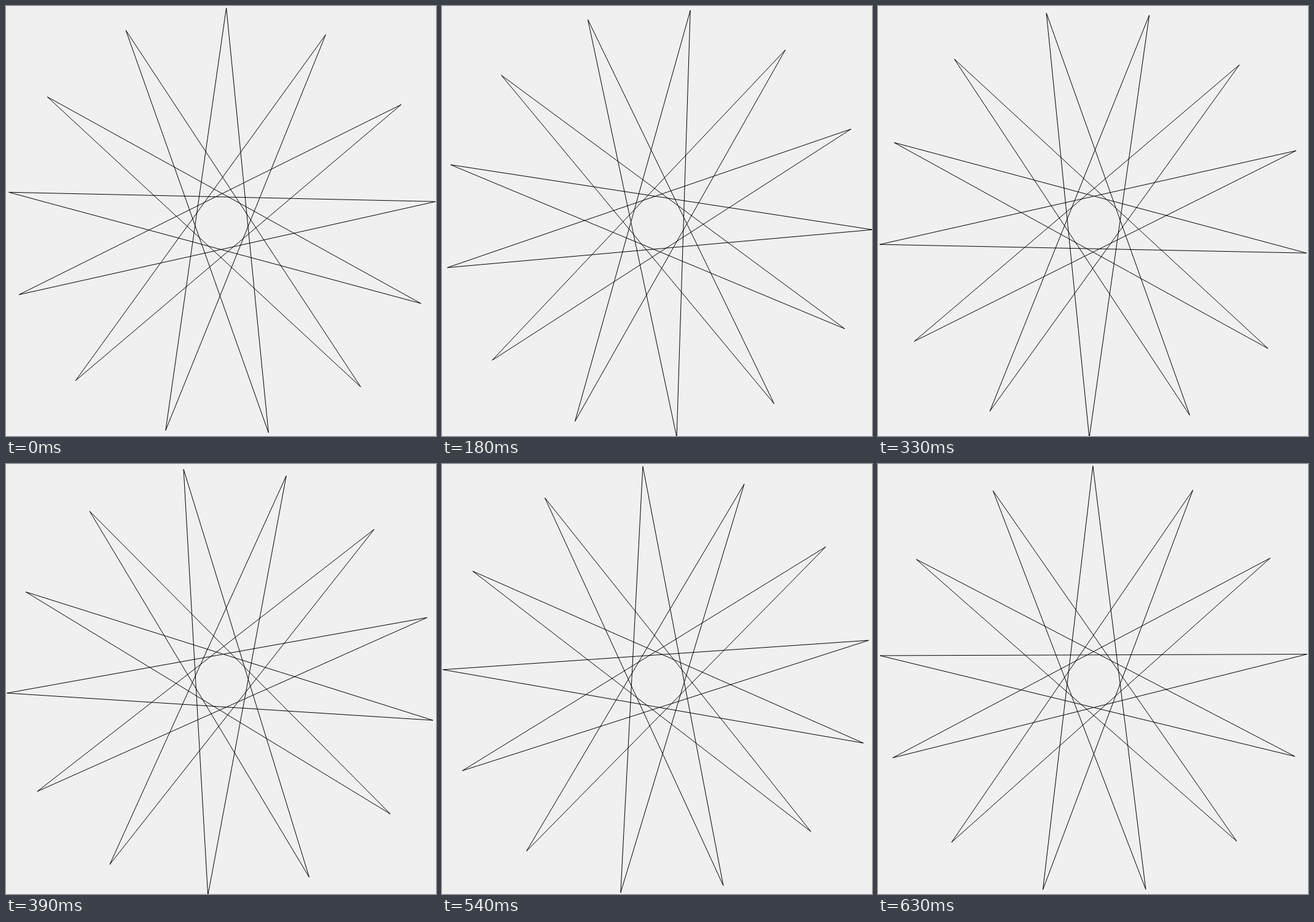
Recreate the animation shown at these times as an HTML page with a canvas. Size 700 by 700 pixels, loop 660 ms.

```html
<!DOCTYPE html>
<html lang="en">
<head>
<meta charset="utf-8">
<title>Turning star</title>
<style>
  html, body { margin: 0; width: 100%; height: 100%; overflow: hidden; background: #f0f0f0; }
  canvas { display: block; }
</style>
</head>
<body>
<canvas id="stage" width="700" height="700"></canvas>
<script>
const ctx = document.getElementById('stage').getContext('2d');
const SIZE = 700;
const POINTS = 13, SKIP = 6;
const CX = 351, CY = 353, RADIUS = 350;
const STEP_MS = 30, STEPS = 22, STEP_DEG = 1.25;

// Tip k of the star, clockwise from the top.
function tip(k, turn) {
  const a = (turn + k * 360 / POINTS) * Math.PI / 180;
  return [CX + RADIUS * Math.sin(a), CY - RADIUS * Math.cos(a)];
}

function line(p, q) {
  ctx.beginPath();
  ctx.moveTo(...p);
  ctx.lineTo(...q);
  ctx.stroke();
}

function draw(step) {
  const turn = (step + 1) * STEP_DEG;
  ctx.fillStyle = '#f0f0f0';
  ctx.fillRect(0, 0, SIZE, SIZE);
  ctx.strokeStyle = '#000';
  ctx.lineWidth = 1;
  for (let k = 0; k < POINTS; k++) line(tip(k, turn), tip(k + SKIP, turn));
}

const start = performance.now();
let shown = 0;
draw(0);

function tick() {
  const step = Math.floor((performance.now() - start) / STEP_MS) % STEPS;
  if (step !== shown) draw(shown = step);
  requestAnimationFrame(tick);
}
requestAnimationFrame(tick);
</script>
</body>
</html>
```
